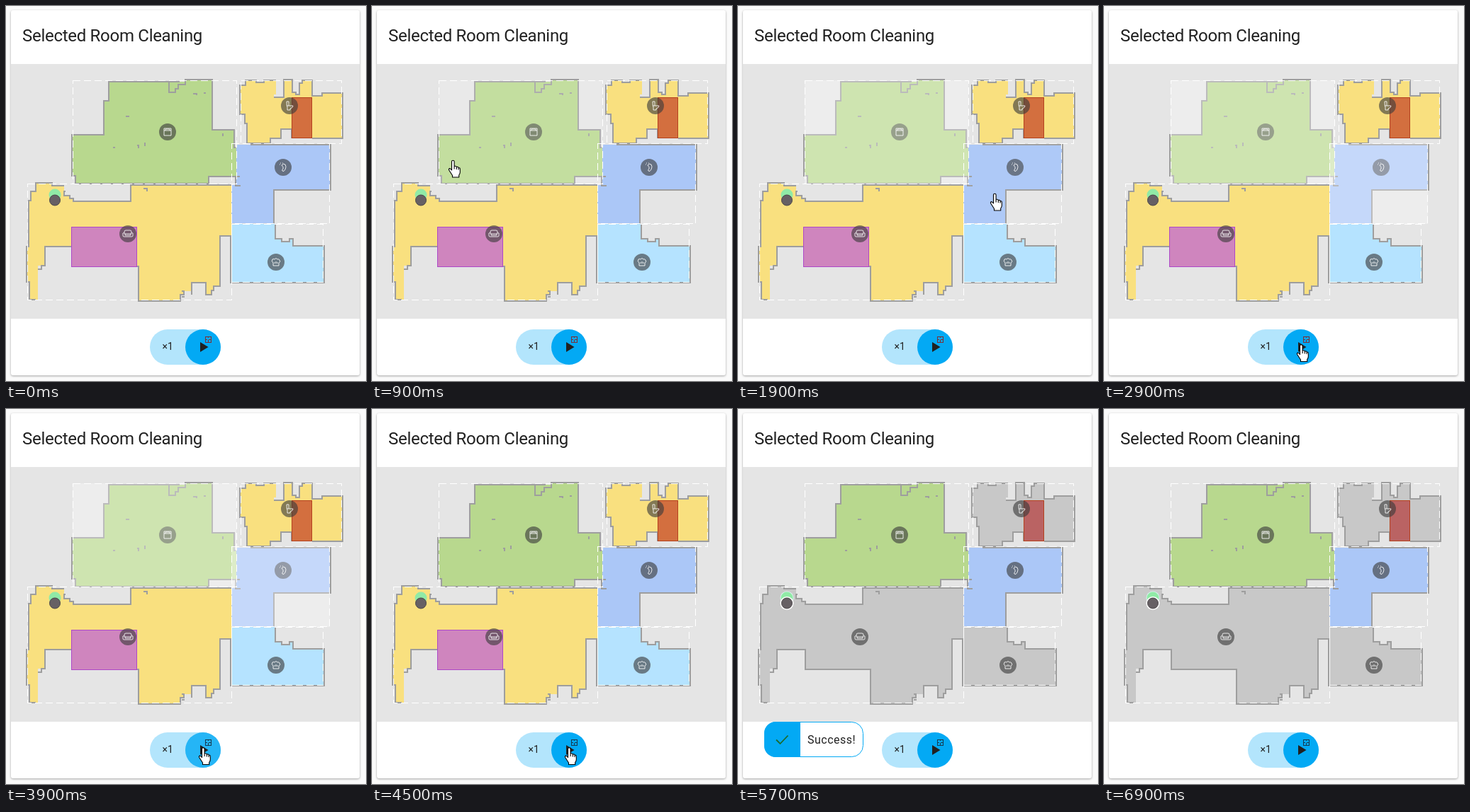
Recreate the animation shown at these times as an HTML page. Size 508 px wide and 530 px high, loop 8000 ms.

```html
<!DOCTYPE html>
<html lang="en">
<head>
<meta charset="utf-8">
<title>Selected Room Cleaning</title>
<style>
  html, body { margin: 0; width: 100%; height: 100%; overflow: hidden; background: #fafafa; }
  svg { display: block; width: 508px; height: 530px; font-family: Roboto, sans-serif; fill: #212121; }
  .map { shape-rendering: crispEdges; }
  .yellow { fill: #f9e07f; }
  .green { fill: #b8d88e; }
  .blue { fill: #abc7f7; }
  .sky { fill: #b5e3ff; }
  .cleaning .yellow, .cleaning .sky { fill: #c8c8c8; }
  .walls { fill: none; stroke: #9e9e9e; stroke-width: 2; }
  .bounds { fill: none; stroke: #fff; stroke-width: 1.4; stroke-dasharray: 10 5; }
  .badge circle { fill: #3a3a3a; opacity: .62; }
  .badge path { fill: none; stroke: #fff; stroke-width: 1; opacity: .85; }
  .card { filter: drop-shadow(0 1px 1.5px rgba(0, 0, 0, .35)); }
</style>
</head>
<body>
<svg viewBox="0 0 508 530">
  <rect class="card" x="7" y="6" width="492" height="516" rx="3" fill="#fff"/>
  <text x="23" y="50" font-size="24" letter-spacing="-.288">Selected Room Cleaning</text>

  <g id="map">
    <rect x="7" y="82" width="492" height="360" fill="#e5e5e5"/>
    <g class="map">
      <path class="green" d="M145 107H253V104H291V175H322V200H325V241H286V251H98V240H93V182H138V134H145Z"/>
      <path class="yellow" d="M42 250H65V254H82V268H90V272H95V276H176V253H318V325H302V396H293V402H290V408H282V391H262V403H251V408H246V417H187V368H95V340H55V367H45V415H33V390H29V340H32V275H35V262H42Z"/>
      <path class="yellow" d="M338 105H353V108H364V105H381V125H378V129H392V104H404V122H409V125H414V109H418V105H432V127H446V123H475V187H403V174H388V187H373V194H340V166H337V153H330V112H338Z"/>
      <path class="blue" d="M325 196H458V260H378V307H318V253H325Z"/>
      <path class="sky" d="M318 308H380V329H389V333H400V329H405V339H449V391H318Z"/>
      <g class="walls">
        <path d="M145 107H230V122H239V117H243V111H253V104H291V175H322V200H324M330 241H286V251H98V240H93V182H138V134H145V106M230 107H245"/>
        <path d="M324 242V254H331M318 253H176V276H95V272H90V268H82V263M82 254H65V250H42V262H35V275H32V340H29V390H33V415H42M45 372H50V367H55V340H95V368H187V417H246V408H251V403H248M262 408V391H282V408H290V402H293V396H302V325H317V391H449V339H405V329H400V333H389V329H380V308"/>
        <path d="M338 105H353V108H364V105H381M378 129H392V104H404V122H409V125H414V109H418V105H432V127H446V123H475V187H432M403 187V174H388V187H373V194M373 194H340V166H337V153H330V112H338V104M345 196H458V260H378V307"/>
        <path d="M169 156h5M185 197h2v4M151 200h3M264 124h5v2M279 123h3M196 193v5M306 180v4M194 258h5v4M81 262h3M248 411h4" stroke-width="1.6"/>
      </g>
      <rect x="403.5" y="129.5" width="28" height="57" fill="#ad0000" fill-opacity=".5" stroke="#b5421f"/>
      <rect id="zone" x="92.5" y="312.5" width="92" height="56" fill="#cf85be" stroke="#ad48c8"/>
    </g>

    <g id="badges"></g>

    <circle id="dockRing" cx="69" cy="267" r="9.5" fill="#d8f3ee"/>
    <circle cx="69" cy="267" r="8.5" fill="#90eaa6"/>
    <circle id="robotRing" cx="69" cy="274.5" r="9.5" fill="#fff"/>
    <circle cx="69" cy="274.5" r="7.5" fill="#666064" stroke="#494548"/>

    <rect id="bedroomPick" x="94" y="105" width="231" height="147" fill="#fff"/>
    <rect id="hallPick" x="318" y="195" width="139" height="113" fill="#fff"/>
    <path class="bounds map" d="M94.5 105.5H325.5V251.5H94.5ZM331.5 105.5H473.5V194.5H331.5ZM318.5 194.5H456.5V307.5H318.5ZM318.5 308.5H447.5V390.5H318.5ZM30.5 251.5H318.5V415.5H30.5Z"/>
  </g>

  <rect x="203" y="457" width="100" height="50" rx="25" fill="#b3e5fc"/>
  <circle cx="278" cy="482" r="25" fill="#03a9f4"/>
  <circle id="ripple" cx="278" cy="482" fill="#fff"/>
  <text x="220.5" y="486" font-size="14">×1</text>
  <path d="M274 475V489L285.5 482Z"/>
  <path id="planIcon" d="M281.5 467.5H289.5V475.5H281.5ZM281.5 471.5H284M286 471.5H289.5M285.5 467.5V469M285.5 471.5V475.5" fill="none" class="map"/>

  <g id="toast">
    <rect x="37.5" y="442.5" width="139" height="49" rx="16" fill="#fff"/>
    <path d="M88 442V492H53A16 16 0 0 1 37 476V458A16 16 0 0 1 53 442Z" fill="#03a9f4"/>
    <rect x="37.5" y="442.5" width="139" height="49" rx="16" fill="none" stroke="#03a9f4"/>
    <path d="M54 467.5L59.5 473L70.5 461.5" fill="none" stroke="#1d6b2c" stroke-width="1.8"/>
    <text x="98" y="473" font-size="16" letter-spacing=".5">Success!</text>
  </g>

  <path id="hand" d="M-2 13.5V1.5a1.8 1.8 0 0 1 3.6 0V8q2.6-.8 3.2 1q2.4-.6 2.8 1q2.2-.2 2.2 2V16.5q0 2-1.6 4V23.5H-1V21L-5.8 13.5q-.8-2 .8-2.4q1.4 0 3 2.4ZM1.6 8V12M4.8 9V12.5M7.6 10V13" fill="#fff" stroke="#000" stroke-width="1.1" stroke-linejoin="round"/>
</svg>

<script>
const LOOP = 8000, STEP = 200, OFFSET = 100;
const el = id => document.getElementById(id);

const badges = [
  [228, 178, "M-5-5H5V5H-5ZM-5-2H5M-3-2V-4H3V-2"],
  [400, 141, "M-4-6H-1V0H5Q5 3 1 4V6H-3V2Q-4 1-4-6ZM-1 0H-4"],
  [391, 228, "M-2-3Q0-6 3-4Q5-1 3 3Q1 7-1 5Q-2 4 0 2Q1 0-2-3ZM-5-4h1M-4-6h1M-1-6h1"],
  [172, 322, "M-5-1V-3Q-5-5-3-5H3Q5-5 5-3V-1M-4 2V0Q-5-2-7-1V3Q-7 4-5 4H5Q7 4 7 3V-1Q5-2 4 0V2ZM-4 0H4"],
  [381, 362, "M-4 5V1Q-7-1-5-4Q-3-5-2-4Q0-7 2-4Q4-5 5-3Q7 0 4 1V5ZM-2 2V0M0 2V-1M2 2V0"]
];
el("badges").innerHTML = badges.map(([x, y, d]) =>
  `<g class="badge" transform="translate(${x} ${y})"><circle r="12"/><path d="${d}"/></g>`).join("");

// Pointer path: time, x, y of the fingertip
const pointer = [
  [500, 74, 252], [700, 105, 227], [900, 114.5, 218.5], [1100, 114.5, 218.5],
  [1300, 200, 232], [1500, 300, 250], [1700, 352, 262], [1900, 362.5, 265.5], [2300, 361, 268],
  [2500, 325, 380], [2700, 289, 465], [2900, 278.5, 479], [4900, 278.5, 479],
  [5100, 284, 489], [5300, 296, 514], [5500, 302, 540]
];

const ramp = (t, from, to) => Math.min(1, Math.max(0, (t - from) / (to - from)));
const pulse = (t, a, b, c, d) => ramp(t, a, b) - ramp(t, c, d);
const show = (id, amount) => el(id).setAttribute("opacity", +amount);

function pointerAt(t) {
  const i = pointer.findIndex(key => key[0] > t);
  if (i < 1) return null;
  const [t0, x0, y0] = pointer[i - 1], [t1, x1, y1] = pointer[i];
  const k = ramp(t, t0, t1);
  return [x0 + (x1 - x0) * k, y0 + (y1 - y0) * k];
}

function draw(time) {
  const t = Math.floor((time - OFFSET) / STEP) * STEP + OFFSET;
  const cleaning = t >= 5500;

  el("map").classList.toggle("cleaning", cleaning);
  show("zone", !cleaning);
  show("dockRing", cleaning);
  show("robotRing", cleaning);
  show("bedroomPick", .3 * pulse(t, 700, 1100, 3900, 4300));
  show("hallPick", .3 * pulse(t, 1850, 2300, 3900, 4300));

  el("ripple").setAttribute("r", 25 * ramp(t, 3300, 3700));
  show("ripple", .2 * pulse(t, 3300, 3500, 3700, 4300));
  el("planIcon").setAttribute("stroke", t < 3500 ? "#7d2f35" : "#17394f");

  const toast = pulse(t, 5300, 5700, 6300, 6900);
  show("toast", toast);
  el("toast").setAttribute("transform", `translate(0 ${-25 * (1 - toast)})`);

  const tip = pointerAt(t);
  show("hand", !!tip);
  if (tip) el("hand").setAttribute("transform", `translate(${tip})`);
}

const start = performance.now();
function tick() {
  draw((performance.now() - start) % LOOP);
  requestAnimationFrame(tick);
}
tick();
</script>
</body>
</html>
```
